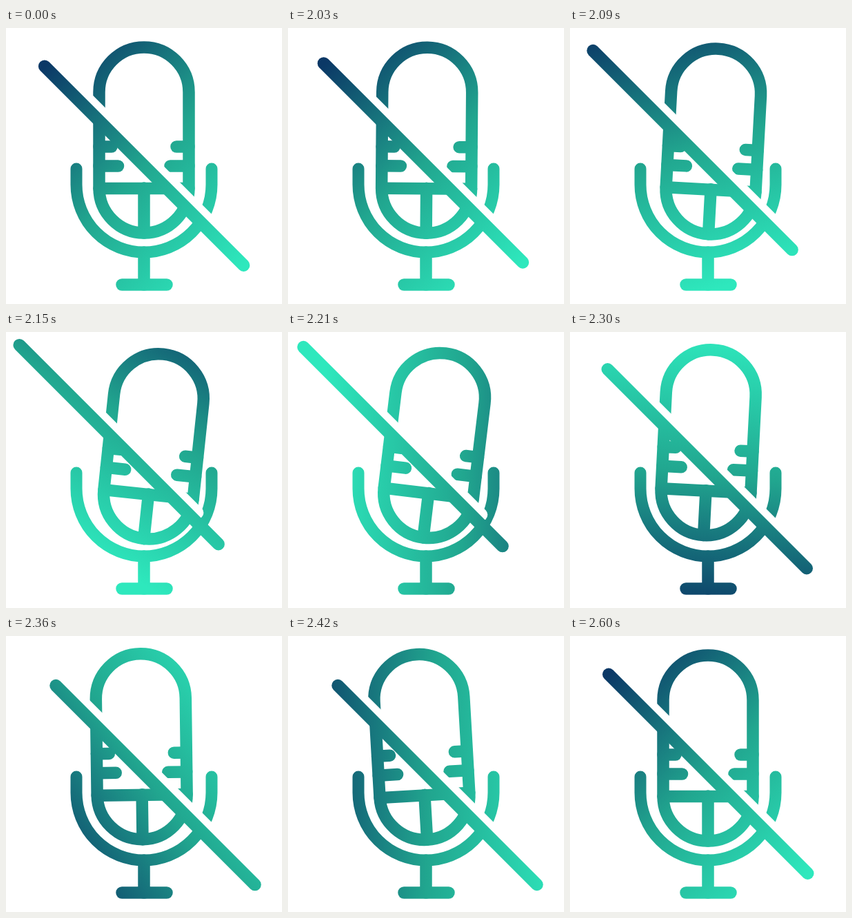
Animation, 400 px wide and 400 px high, one loop 2630 ms. Source, as an HTML page with a canvas:

```html
<!DOCTYPE html>
<html lang="en">
<head>
<meta charset="utf-8">
<title>Muted microphone</title>
<style>
html, body { margin: 0; width: 100%; height: 100%; overflow: hidden; background: #fff; }
canvas { display: block; width: 400px; height: 400px; }
</style>
</head>
<body>
<canvas id="stage" width="400" height="400"></canvas>
<script>
const ctx = document.getElementById('stage').getContext('2d');
const LOOP = 2630, REST = 2000, STEP = 30, SHAKE = 600;
const REACH = 204;

// [time, value] pairs, eased in and out between neighbours
const slashKeys = [[-5, 0], [160, -37], [180, -37], [380, 17.8], [600, 0]];
const tiltKeys = [[0, 0], [195, 7], [445, -3.6], [600, 0]];
const swayX = [[0, 0], [155, 6.6], [310, -3.1], [600, 0]];
const swayY = [[0, 0], [155, 3], [310, -2.4], [600, 0]];
const lightKeys = [[0, 0], [180, -62], [330, 0], [420, 8], [600, 0]];

function at(keys, t) {
  if (t <= keys[0][0]) return keys[0][1];
  for (let i = 1; i < keys.length; i++) {
    const [t0, v0] = keys[i - 1], [t1, v1] = keys[i];
    if (t <= t1) {
      const u = (t - t0) / (t1 - t0);
      return v0 + (v1 - v0) * u * u * (3 - 2 * u);
    }
  }
  return keys[keys.length - 1][1];
}

// cubic-bezier(.33, 0, .45, 1)
function spinEase(x) {
  let lo = 0, hi = 1;
  for (let i = 0; i < 24; i++) {
    const m = (lo + hi) / 2, n = 1 - m;
    if (3 * n * n * m * 0.33 + 3 * n * m * m * 0.45 + m * m * m < x) lo = m;
    else hi = m;
  }
  return lo * lo * (3 - 2 * lo);
}

function paint(t) {
  const angle = (225 + 360 * spinEase(t / SHAKE)) * Math.PI / 180;
  const shift = at(lightKeys, t);
  const dx = Math.cos(angle), dy = Math.sin(angle);
  const point = d => [200 + dx * d, 200 + dy * d];
  const g = ctx.createLinearGradient(...point(REACH - shift), ...point(-REACH - shift));
  g.addColorStop(0, '#0b3866');
  g.addColorStop(0.5, '#21a68f');
  g.addColorStop(1, '#2ee8bd');
  return g;
}

function line(x0, y0, x1, y1) {
  ctx.beginPath();
  ctx.moveTo(x0, y0);
  ctx.lineTo(x1, y1);
  ctx.stroke();
}

function capsulePath() {
  ctx.beginPath();
  ctx.arc(200, 93, 65, Math.PI, 0);
  ctx.arc(200, 232, 65, 0, Math.PI);
  ctx.closePath();
}

// The gradient stays fixed to the stage while the path is tilted,
// so each path is built in tilted space and stroked after the reset.
function tilted(t, build) {
  ctx.save();
  ctx.translate(200 + at(swayX, t), 232 + at(swayY, t));
  ctx.rotate(at(tiltKeys, t) * Math.PI / 180);
  ctx.translate(-200, -232);
  build();
  ctx.restore();
  ctx.stroke();
}

function seg(x0, y0, x1, y1) {
  return () => {
    ctx.beginPath();
    ctx.moveTo(x0, y0);
    ctx.lineTo(x1, y1);
  };
}

function draw(t) {
  const ink = paint(t);
  ctx.fillStyle = '#fff';
  ctx.fillRect(0, 0, 400, 400);
  ctx.strokeStyle = ink;
  ctx.lineCap = 'round';
  ctx.lineWidth = 17.5;

  // head
  tilted(t, capsulePath);
  tilted(t, seg(135, 232.5, 265, 232.5));
  tilted(t, seg(200, 232, 200, 297));
  tilted(t, seg(135, 172, 153, 172));
  tilted(t, seg(135, 200, 162.5, 200));
  tilted(t, seg(265, 172, 247, 172));
  tilted(t, seg(265, 200, 238, 200));

  // cradle and stand
  ctx.lineWidth = 17;
  ctx.beginPath();
  ctx.moveTo(102, 204);
  ctx.arc(200, 227, 98, Math.PI, 0, true);
  ctx.lineTo(298, 204);
  ctx.stroke();
  ctx.lineWidth = 17.5;
  line(200, 325, 200, 372);
  line(168, 372, 233, 372);

  // slash with its clear edge
  const d = at(slashKeys, t);
  ctx.lineWidth = 18;
  ctx.strokeStyle = '#fff';
  line(88 + d, 72.5 + d, 314 + d, 298.5 + d);
  ctx.strokeStyle = ink;
  line(56 + d, 55.5 + d, 344.5 + d, 344 + d);
}

function frame() {
  const now = performance.now() % LOOP;
  const t = Math.floor((now - REST) / STEP) * STEP;
  draw(Math.min(SHAKE, Math.max(0, t)));
  requestAnimationFrame(frame);
}
frame();
</script>
</body>
</html>
```
